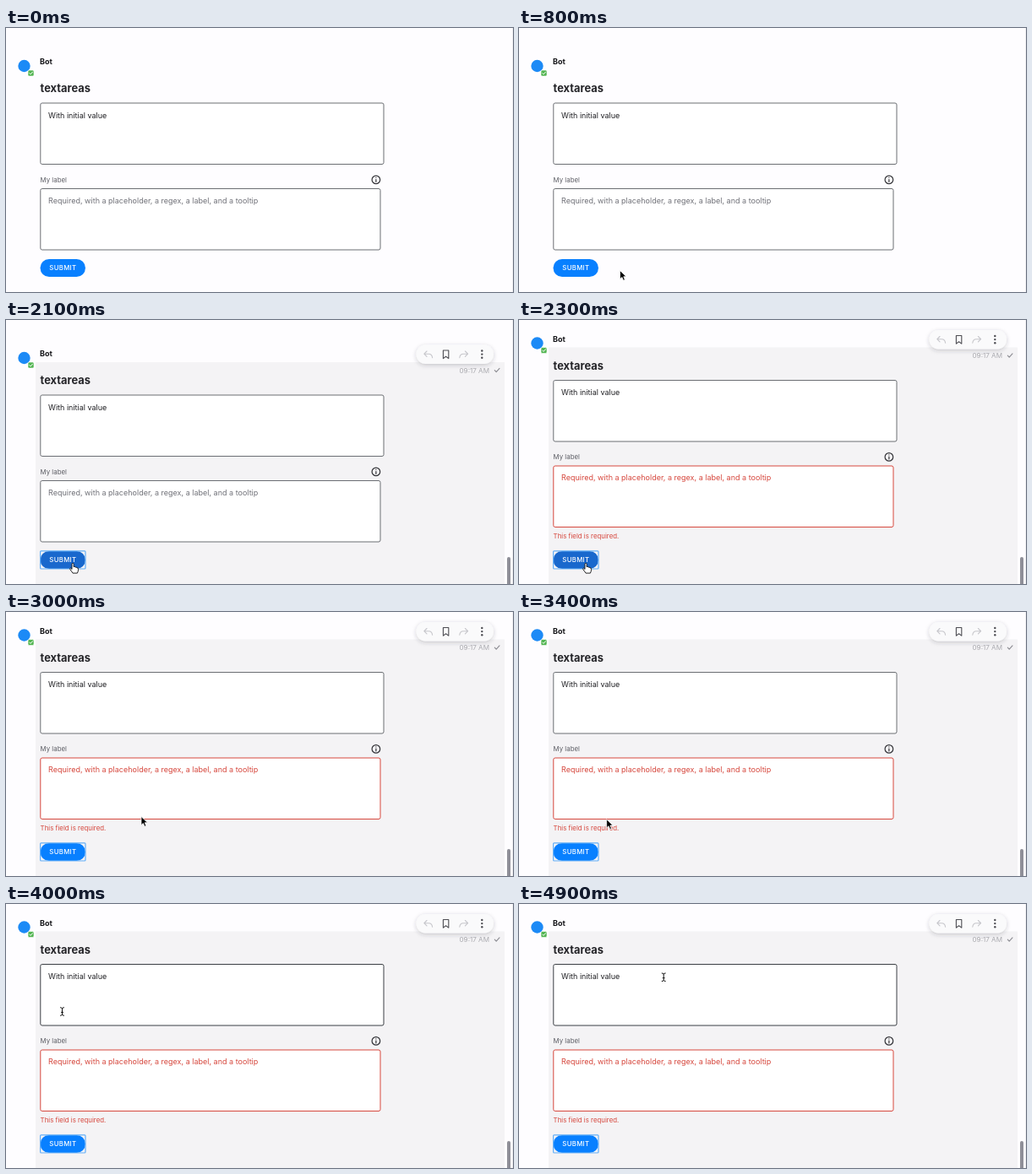
An HTML page that plays this animation: 600x313 px, repeating every 5000 ms.

```html
<!DOCTYPE html>
<html lang="en">
<head>
<meta charset="utf-8">
<title>Textareas form</title>
<style>
html, body { margin: 0; width: 100%; height: 100%; overflow: hidden; background: #fefdff; }
svg { display: block; width: 100vw; height: 100vh; font-family: Inter, Roboto, sans-serif; }
.field { fill: #fff; stroke: #6b6e73; stroke-width: 1; }
.body { font-size: 9.03px; }
.small { font-size: 7.85px; }
.line { fill: none; stroke-linecap: round; stroke-linejoin: round; }
</style>
</head>
<body>
<svg viewBox="0 0 600 313">
  <defs>
    <filter id="shadow" x="-20%" y="-60%" width="140%" height="240%">
      <feDropShadow dx="0" dy="1.5" stdDeviation="2.6" flood-color="#30303a" flood-opacity=".24"/>
    </filter>
  </defs>
  <rect width="600" height="313" fill="#fefdff"/>
  <path d="M599.5 0V313" stroke="#f0eff2"/>

  <g id="page">
    <rect id="hover" x="35" y="50" width="555" height="300" fill="#f4f3f5"/>
    <circle cx="21.5" cy="45" r="7.2" fill="#1c8af6"/>
    <rect x="26" y="50" width="7" height="7" rx="1.6" fill="#54b653" stroke="#fff" stroke-width=".6"/>
    <path class="line" d="M27.8 53.6l1.3 1.3 2.3-2.7" stroke="#fff"/>
    <text class="body" x="40" y="43.3" font-weight="700" fill="#17171b">Bot</text>
    <text x="40.6" y="76" font-size="12.9" font-weight="700" fill="#242428">textareas</text>

    <rect id="first" class="field" x="40.8" y="89" width="406.2" height="72.5" rx="2"/>
    <text class="body" x="50" y="106.6" fill="#1d1d21">With initial value</text>

    <text class="small" x="40.6" y="182.5" fill="#5d5e65">My label</text>
    <g stroke="#303035" class="line">
      <circle cx="437.9" cy="179.9" r="4.8" stroke-width="1.2"/>
      <path d="M437.9 179.6V182.3M437.9 177.4v.1" stroke-width="1.2"/>
    </g>
    <rect id="second" class="field" x="40.8" y="190.5" width="402.2" height="72.5" rx="2"/>
    <text id="hint" class="body" x="50" y="207.8">Required, with a placeholder, a regex, a label, and a tooltip</text>
    <text id="error" class="small" x="40.6" y="276.5" fill="#d6473d">This field is required.</text>

    <g id="tools">
      <rect x="485.5" y="29.5" width="91.5" height="22.5" rx="11.2" fill="#fafafb" filter="url(#shadow)"/>
      <g class="line" stroke-width="1.1">
        <path d="M498 37l-3.2 3.2 3.2 3.2M495 40.2h5.3q3.8 0 4.3 4.6" stroke="#c6c6cb"/>
        <path d="M517.4 36h6.4v9.6l-3.2-2.3-3.2 2.3z" stroke="#4c4c52"/>
        <path d="M543.4 37l3.2 3.2-3.2 3.2M546.4 40.2h-5.3q-3.8 0-4.3 4.6" stroke="#c6c6cb"/>
      </g>
      <g fill="#4c4c52">
        <circle cx="563.3" cy="36.5" r="1.2"/><circle cx="563.3" cy="40.6" r="1.2"/><circle cx="563.3" cy="44.7" r="1.2"/>
      </g>
      <text x="536.5" y="62.6" font-size="8.1" fill="#aaaaaf">09:17 AM</text>
      <path class="line" d="M578.3 59.7l1.9 2 3.8-4.3" stroke="#8b8b91" stroke-width="1.1"/>
    </g>
  </g>

  <rect id="button" x="40.5" y="274" width="53.5" height="21" rx="10.5"/>
  <rect id="ring" x="40.6" y="273.8" width="53.4" height="21.2" rx="1" fill="none" stroke="#62aef8" stroke-width="1.2"/>
  <text x="67.4" y="287.1" font-size="7.8" font-weight="500" letter-spacing=".3" text-anchor="middle" fill="#fff">SUBMIT</text>
  <path id="bar" d="M593 313V283a2 2 0 0 1 4 0V313z" fill="#8f8f98"/>

  <g id="cursor">
    <path id="arrow" d="M0 0V10.2L2.4 8 4 11.8 5.9 11 4.3 7.3H7.5z" fill="#000" stroke="#fff" stroke-width=".8" stroke-linejoin="round"/>
    <path id="hand" d="M-1 1Q-1-.3 0-.3T1.1 1V4.2Q2.7 3.4 3.2 4.7 4.6 4.1 5 5.4 6.6 5 6.6 6.8 6.6 9.4 5.4 11.6H0Q-1.2 9.6-3.2 7.1-3.7 5.7-2.5 5.7L-1 7z" fill="#fff" stroke="#111" stroke-width=".9" stroke-linejoin="round"/>
    <g id="beam" class="line">
      <path id="stem" d="M-2-4.8Q-.2-4.8 0-3.6 .2-4.8 2-4.8M0-3.6V3.6M-2 4.8Q-.2 4.8 0 3.6 .2 4.8 2 4.8M-1 .9H1" stroke="#fff" stroke-width="2"/>
      <use href="#stem" style="stroke:#111"/>
      <path d="M-2-4.8Q-.2-4.8 0-3.6 .2-4.8 2-4.8M0-3.6V3.6M-2 4.8Q-.2 4.8 0 3.6 .2 4.8 2 4.8M-1 .9H1" stroke="#111" stroke-width="1"/>
    </g>
  </g>
</svg>
<script>
const LOOP = 5000, STEP = 100, SHIFT = 17.5;
const $ = id => document.getElementById(id);
const set = (id, name, value) => $(id).setAttribute(name, value);
const show = (id, on) => set(id, 'visibility', on ? 'visible' : 'hidden');
const ramp = (t, a, b) => Math.max(0, Math.min(1, (t - a) / (b - a)));
const ease = p => p * p * (3 - 2 * p);
const mix = (a, b, p) => `rgb(${a.map((v, i) => Math.round(v + (b[i] - v) * p))})`;

// time, x, y of the pointer
const path = [
  [300, 129, 293], [800, 119.5, 287.5], [1500, 119.5, 287.5], [2000, 79, 288.5],
  [2500, 79, 288.5], [3000, 160, 242.5], [3100, 159, 243], [3700, 48.3, 248.5],
  [4000, 66.5, 127.5], [4300, 67, 101], [4400, 67, 101], [4500, 187, 95], [4600, 171.2, 86.8]
];

function pointer(t) {
  if (t <= path[0][0]) return path[0].slice(1);
  for (let i = 1; i < path.length; i++) {
    const [a, ax, ay] = path[i - 1], [b, bx, by] = path[i];
    if (t <= b) {
      const p = ease(ramp(t, a, b));
      return [ax + (bx - ax) * p, ay + (by - ay) * p];
    }
  }
  return path[path.length - 1].slice(1);
}

const GREY = [107, 110, 115], RED = [214, 71, 61], HINT = [112, 113, 120];
const BLUE = [8, 128, 255], DEEP = [25, 104, 205];

function draw(t) {
  const hovered = t >= 1600, failed = t >= 2200;
  const dy = failed ? -SHIFT : 0;
  const red = failed ? ramp(t, 2100, 2300) : 0;
  const [x, y] = pointer(t);

  set('page', 'transform', `translate(0 ${dy})`);
  show('hover', hovered);
  show('bar', hovered);
  set('tools', 'opacity', hovered ? ramp(t, 1550, 1850) * .85 + ramp(t, 1600, 1850) * .15 : 0);
  set('error', 'opacity', red);
  $('second').style.stroke = mix(GREY, RED, red);
  $('hint').style.fill = mix(HINT, RED, red);

  const inX = x > 41 && x < 443;
  const inFirst = inX && y > 91 + dy - 4 && y < 161 + dy;
  const inSecond = inX && y > 191 + dy && y < 240;
  const onButton = x > 41 && x < 94 && y > 274 && y < 295;
  $('first').style.stroke = inFirst ? '#3b3f44' : mix(GREY, GREY, 0);

  const press = ramp(t, 1700, 2000) * (1 - ramp(t, 2600, 2800));
  set('button', 'fill', mix(BLUE, DEEP, press));
  show('ring', t >= 2100);

  const kind = onButton ? 'hand' : inFirst || inSecond ? 'beam' : 'arrow';
  set('cursor', 'transform', `translate(${x} ${y})`);
  for (const id of ['arrow', 'hand', 'beam']) $(id).style.display = id === kind ? '' : 'none';
  show('cursor', t >= 300);
}

// the stem is drawn once as a pale halo, once in black
document.querySelector('#beam use').remove();

const start = performance.now();
function frame() {
  const t = (performance.now() - start) % LOOP;
  draw(Math.floor(t / STEP) * STEP);
  requestAnimationFrame(frame);
}
frame();
</script>
</body>
</html>
```
